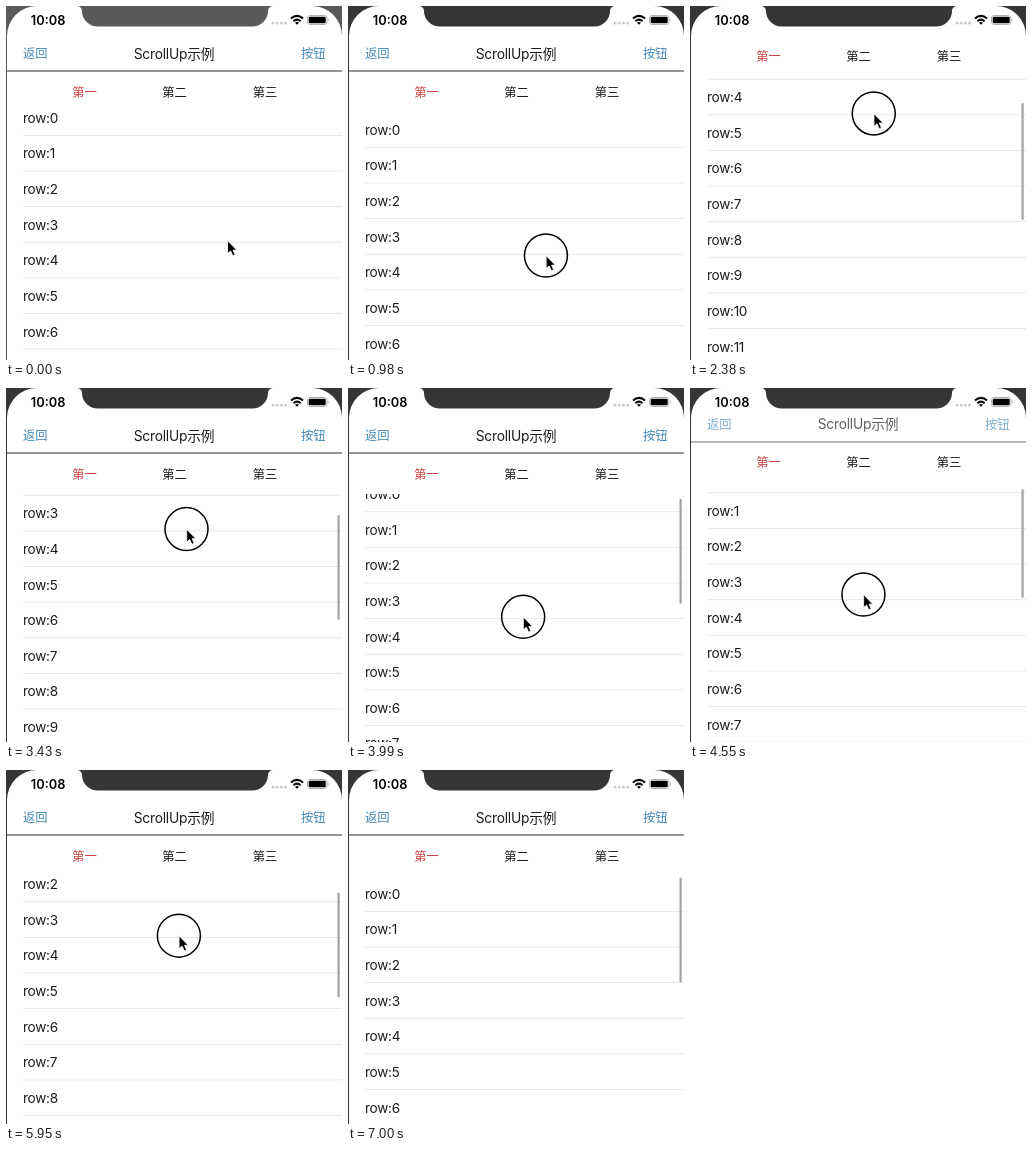
These frames come from a looping animation (336 px wide and 354 px high, 7.07 s). An HTML page:

```html
<!DOCTYPE html>
<html lang="zh-CN">
<head>
<meta charset="utf-8">
<title>ScrollUp示例</title>
<style>
html, body { margin: 0; width: 100%; height: 100%; overflow: hidden; background: #fff; }
svg { display: block; width: 336px; height: 354px; }
text { font-family: Inter, "Noto Sans CJK SC", "Noto Sans CJK", sans-serif; fill: #1c1c1c; }
.body { font-size: 13.6px; letter-spacing: -.3px; }
.title { font-size: 13.8px; letter-spacing: -.25px; }
.cjk { font-size: 12.3px; font-family: "Noto Sans CJK SC", "Noto Sans CJK", sans-serif; font-weight: 350; }
.mid { text-anchor: middle; }
.link { fill: #4389b8; }
.on { fill: #cb4444; }
.clock { font-size: 12.8px; font-weight: 600; fill: #000; }
</style>
</head>
<body>
<svg viewBox="0 0 336 354">
  <rect width="336" height="354" fill="#fff"/>
  <g id="rows"></g>
  <g id="head">
    <rect y="-40" width="336" height="146" fill="#fff"/>
    <text class="cjk mid on" x="78.5" y="90.5">第一</text>
    <text class="cjk mid" x="168.5" y="90.5">第二</text>
    <text class="cjk mid" x="259" y="90.5">第三</text>
    <g id="nav">
      <text class="cjk link" x="17" y="52.2">返回</text>
      <text class="title mid" x="168" y="52.5">ScrollUp示例</text>
      <text class="cjk link" x="295" y="52.2">按钮</text>
      <rect y="64.4" width="336" height="1.2" fill="#505050"/>
    </g>
  </g>
  <rect id="bar" x="331.5" width="2.2" rx="1.1" fill="#a2a2a2"/>
  <text class="clock" x="24.8" y="18.6">10:08</text>
  <g id="signal" fill="#c9c9c9"></g>
  <g fill="none" stroke="#000" stroke-width="2">
    <path d="M285 12.6Q291 7.2 297 12.6M287.4 15.2Q291 12 294.6 15.2"/>
    <path d="M291 18.8L289 16.7Q291 15.2 293 16.7Z" fill="#000" stroke="none"/>
  </g>
  <rect x="301.5" y="9.5" width="19.5" height="9" rx="2.6" fill="none" stroke="#b0b0b0"/>
  <rect x="302.7" y="10.7" width="17" height="6.6" rx="1.4"/>
  <path d="M322 12.4Q323.8 14 322 15.6Z" fill="#b0b0b0"/>
  <path id="shell" d="M0 0H31A30 30 0 0 0 1 30V354H0Z M71 0A5 5 0 0 1 76 5A16 15.5 0 0 0 92 20.5H246A16 15.5 0 0 0 262 5A5 5 0 0 1 267 0Z M306 0H336V30A30 30 0 0 0 306 0Z"/>
  <g id="pointer">
    <circle id="ring" r="21.5" fill="none" stroke="#000" stroke-width="1.5"/>
    <path d="M.2 .2V13L3.2 10.4L5.4 15.2L7.7 14.2L5.6 9.6H9.4Z" fill="#000" stroke="#fff" stroke-width=".8"/>
  </g>
</svg>
<script>
const LOOP = 7070, STEP = 70, PITCH = 35.62, NAV = 36;
const $ = id => document.getElementById(id);
const set = (el, name, value) => el.setAttribute(name, value);
const [rows, head, nav, bar, signal, shell, pointer, ring] =
  ["rows", "head", "nav", "bar", "signal", "shell", "pointer", "ring"].map($);

const home = { x: 221.4, y: 234.5 };
const strokes = [
  { from: 490, to: 770, x: 198, y: 250 },
  { from: 917, to: 2624, x: 183, y: 100 },
  { from: 2950, to: 4308, x: 174, y: 248 },
  { from: 4310, to: 4986, x: 172, y: 100 },
  { from: 5200, to: 6830, x: 174, y: 250 }
];

// Cosine ease from 0 to 1 between two times
function ease(t, from, to) {
  const u = Math.min(1, Math.max(0, (t - from) / (to - from)));
  return (1 - Math.cos(Math.PI * u)) / 2;
}

function finger(t) {
  let { x, y } = home;
  for (const s of strokes) {
    const e = ease(t, s.from, s.to);
    x += (s.x - x) * e;
    y += (s.y - y) * e;
  }
  return { x, y };
}

function add(parent, name, attrs, label) {
  const el = document.createElementNS("http://www.w3.org/2000/svg", name);
  for (const k in attrs) set(el, k, attrs[k]);
  if (label) el.textContent = label;
  parent.append(el);
}

for (let i = 0; i < 20; i++) {
  const y = 124 + i * PITCH;
  add(rows, "text", { class: "body", x: 17, y: y + 4.8 }, "row:" + i);
  add(rows, "rect", { x: 17, y: y + 17, width: 319, height: 0.8, fill: "#e4e4e4" });
}
for (let i = 0; i < 4; i++) add(signal, "circle", { cx: 267 + i * 4.2, cy: 17.2, r: 1.4 });

function draw(t) {
  const { x, y } = finger(t);
  const hidden = ease(t, 1150, 1450) + ease(t, 4470, 4684);
  const shown = ease(t, 2700, 3050) + ease(t, 5350, 5600);
  const lift = NAV * (hidden - shown);
  // The list lags behind the finger while the header slides away
  const part = hidden % 1;
  const lag = 47 * Math.min(part, 1 - part);
  const scroll = Math.max(0, 246.5 - y - lag);

  set(rows, "transform", `translate(0 ${-lift - scroll})`);
  set(head, "transform", `translate(0 ${-lift})`);
  set(nav, "opacity", 1 - lift / NAV);
  set(bar, "y", 107.6 - lift + scroll * 0.183);
  set(bar, "height", 105 + lift / 3);
  set(bar, "opacity", t >= 1120 ? 1 : 0);
  set(shell, "fill", t < 910 ? "#595959" : t < 980 ? "#454545" : "#363636");
  set(pointer, "transform", `translate(${x} ${y})`);
  set(pointer, "opacity", t < 6930 ? 1 : 0);
  set(ring, "opacity", t >= 770 && t < 6860 ? 1 : 0);
}

const start = performance.now();
function tick() {
  const t = (performance.now() - start) % LOOP;
  draw(Math.floor(t / STEP) * STEP);
  requestAnimationFrame(tick);
}
tick();
</script>
</body>
</html>
```
